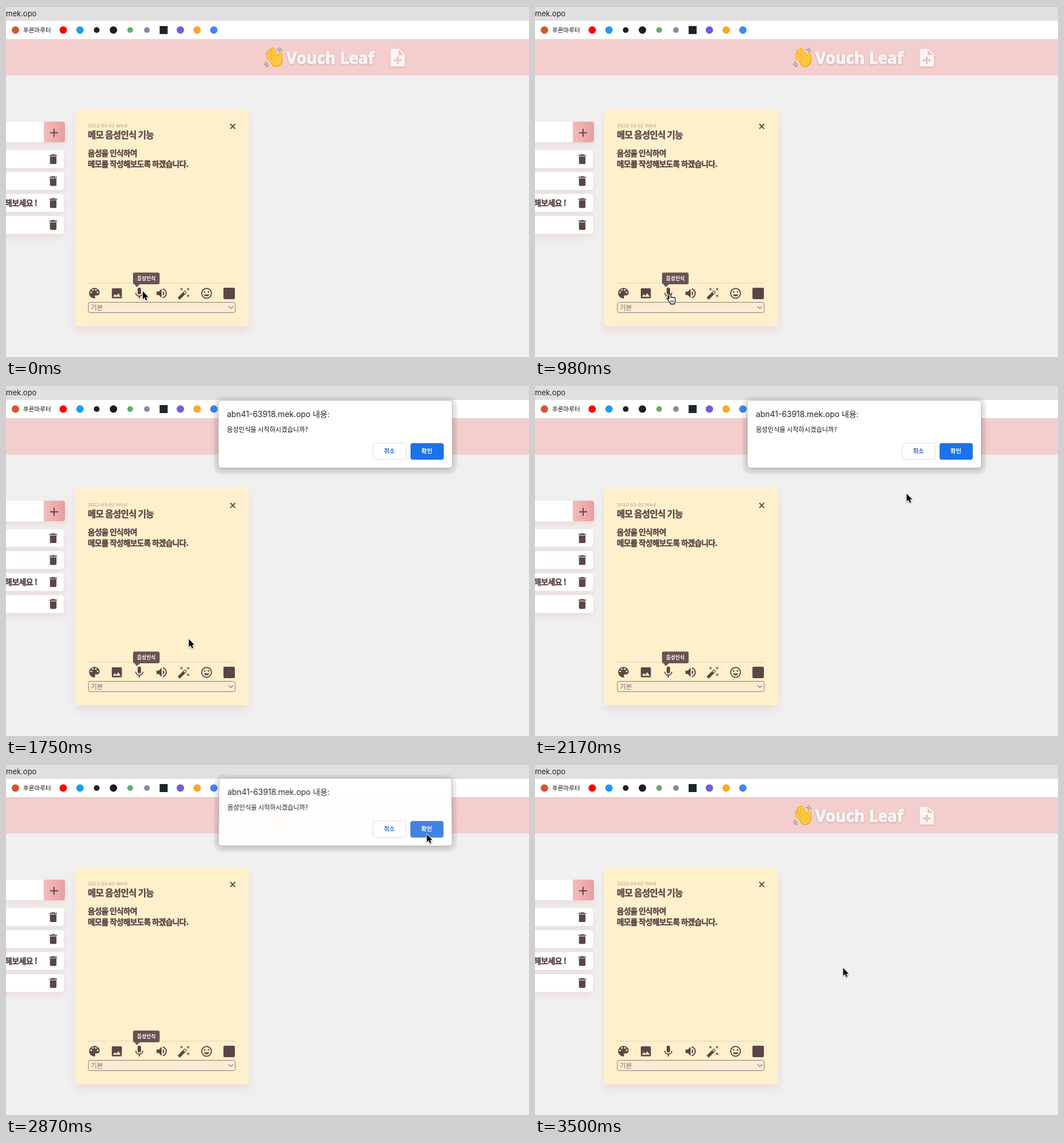
These frames come from a looping animation (914 by 613 pixels, 8 s). An HTML page with a canvas:

```html
<!DOCTYPE html>
<html lang="ko">
<head>
<meta charset="utf-8">
<title>Memo</title>
<style>
html, body { margin: 0; width: 100%; height: 100%; overflow: hidden; background: #f0f0f0; }
canvas { display: block; }
</style>
</head>
<body>
<canvas id="stage" width="914" height="613"></canvas>
<script>
const stage = document.getElementById('stage');
const ctx = stage.getContext('2d');
const LOOP = 8000, STEP = 70;
const BROWN = '#5d4546', CARD = '#fff0cc';
const KR = '"Noto Sans CJK KR", "Noto Sans CJK", sans-serif';
const UI = 'Inter, ' + KR;

// 24-unit icons
const ICON = {
  palette: 'M12 3a9 9 0 0 0 0 18c.83 0 1.5-.67 1.5-1.5 0-.39-.15-.74-.39-1.01-.23-.26-.38-.61-.38-.99 0-.83.67-1.5 1.5-1.5H16c2.76 0 5-2.24 5-5 0-4.42-4.03-8-9-8z' +
    [[6.5, 10.5], [9.5, 6.5], [14.5, 6.5], [17.5, 10.5]].map(([x, y]) => `M${x - 1.5} ${y}a1.5 1.5 0 1 0 3 0a1.5 1.5 0 1 0-3 0z`).join(''),
  image: 'M21 19V5c0-1.1-.9-2-2-2H5c-1.1 0-2 .9-2 2v14c0 1.1.9 2 2 2h14c1.1 0 2-.9 2-2zM8.5 13.5l2.5 3.01L14.5 12l4.5 6H5z',
  mic: 'M12 14a3 3 0 0 0 3-3V5a3 3 0 0 0-6 0v6a3 3 0 0 0 3 3zM17.3 11c0 3-2.54 5.1-5.3 5.1S6.7 14 6.7 11H5c0 3.41 2.72 6.23 6 6.72V21h2v-3.28c3.28-.48 6-3.3 6-6.72z',
  volume: 'M3 9v6h4l5 5V4L7 9zM16.5 12c0-1.77-1.02-3.29-2.5-4.03v8.05c1.48-.73 2.5-2.25 2.5-4.02zM14 3.23v2.06c2.89.86 5 3.54 5 6.71s-2.11 5.85-5 6.71v2.06c4.01-.91 7-4.49 7-8.77s-2.99-7.86-7-8.77z',
  wand: 'M7.5 5.6L10 7 8.6 4.5 10 2 7.5 3.4 5 2l1.4 2.5L5 7zM19.5 15.4L17 14l1.4 2.5L17 19l2.5-1.4L22 19l-1.4-2.5L22 14zM22 2l-2.5 1.4L17 2l1.4 2.5L17 7l2.5-1.4L22 7l-1.4-2.5zM14.37 7.29a1 1 0 0 0-1.41 0L1.29 18.96a1 1 0 0 0 0 1.41l2.34 2.34a1 1 0 0 0 1.41 0L16.7 11.05a1 1 0 0 0 0-1.41zM13.34 12.78l-2.12-2.12 2.44-2.44 2.12 2.12z',
  mood: 'M2 12a10 10 0 1 0 20 0a10 10 0 1 0-20 0zM4 12a8 8 0 1 0 16 0a8 8 0 1 0-16 0zM7 9.5a1.5 1.5 0 1 0 3 0a1.5 1.5 0 1 0-3 0zM14 9.5a1.5 1.5 0 1 0 3 0a1.5 1.5 0 1 0-3 0zM12 17.5c2.33 0 4.31-1.46 5.11-3.5H6.89c.8 2.04 2.78 3.5 5.11 3.5z',
  bin: 'M6 19c0 1.1.9 2 2 2h8c1.1 0 2-.9 2-2V7H6zM19 4h-3.5l-1-1h-5l-1 1H5v2h14z',
  addNote: 'M14 2H6a2 2 0 0 0-2 2v16a2 2 0 0 0 2 2h12a2 2 0 0 0 2-2V8zM16 16h-3v3h-2v-3H8v-2h3v-3h2v3h3zM13 9V3.5L18.5 9z'
};
for (const k in ICON) ICON[k] = new Path2D(ICON[k]);

const ARROW = new Path2D('M1 1.6V15.4L4.2 12.5L6.5 17.6L8.7 16.6L6.5 11.7H10.6Z');
const HAND = new Path2D('M5.2 9.5V2.5a1.5 1.5 0 0 1 3 0V7.3a1.4 1.4 0 0 1 2.7 .3a1.4 1.4 0 0 1 2.7 .5a1.3 1.3 0 0 1 2.5 .8V12.2q0 2-1.2 3.6V18.4H7.5V16.8Q5.5 14.8 4.5 12.7Q3 10.7 1.6 9.8Q.9 8.3 2.5 8.1Q4 8.1 5.2 10Z');

function icon(name, cx, cy, scale = 1, fill = BROWN) {
  ctx.save();
  ctx.translate(cx - 12 * scale, cy - 12 * scale);
  ctx.scale(scale, scale);
  ctx.fillStyle = fill;
  ctx.fill(ICON[name], 'evenodd');
  ctx.restore();
}

function rect(x, y, w, h, fill) {
  ctx.fillStyle = fill;
  ctx.fillRect(x, y, w, h);
}

function box(c, x, y, w, h, r, fill, shadow) {
  c.save();
  if (shadow) [c.shadowColor, c.shadowOffsetY, c.shadowBlur] = shadow;
  c.fillStyle = fill;
  c.beginPath();
  c.roundRect(x, y, w, h, r);
  c.fill();
  c.restore();
}

function frame(c, x, y, w, h, r, color) {
  c.strokeStyle = color;
  c.lineWidth = 1;
  c.beginPath();
  c.roundRect(x, y, w, h, r);
  c.stroke();
}

function text(c, str, x, y, font, fill, align = 'left') {
  c.font = font;
  c.fillStyle = fill;
  c.textAlign = align;
  c.fillText(str, x, y);
}

// Tight, extra heavy lettering for the notes.
function noteText(str, x, y, size) {
  ctx.save();
  ctx.letterSpacing = '-0.6px';
  ctx.lineJoin = 'round';
  ctx.lineWidth = 0.45;
  ctx.strokeStyle = BROWN;
  text(ctx, str, x, y, `700 ${size}px ${KR}`, BROWN);
  ctx.strokeText(str, x, y);
  ctx.restore();
}

function line(color, width, ...pts) {
  ctx.strokeStyle = color;
  ctx.lineWidth = width;
  ctx.beginPath();
  pts.forEach(([x, y]) => ctx.lineTo(x, y));
  ctx.stroke();
}

function bookmarks() {
  rect(0, 0, 914, 26, '#e0e0e0');
  rect(0, 0, 914, 1, '#c4c4c4');
  rect(0, 26, 914, 32, '#fff');
  rect(0, 58, 914, 1, '#d8d0d0');
  text(ctx, 'mek.opo', 0, 18, '13px ' + UI, '#222');
  text(ctx, '푸른마루터', 30, 46, '10.6px ' + KR, '#111');
  const dots = ['#d4562c', '#f00', '#1d9bf0', '#222', '#1b1f23', '#5fae6d', '#7d8fa3', '#1c242c', '#6c5ce7', '#f9a825', '#4285f4'];
  dots.forEach((color, i) => {
    const x = i ? 100 + (i - 1) * 29.25 : 16.5;
    if (i === 7) return rect(x - 7, 35, 14, 14, color);
    ctx.fillStyle = color;
    ctx.beginPath();
    ctx.arc(x, 42, i === 3 || i === 5 || i === 6 ? 5 : 6.5, 0, 7);
    ctx.fill();
  });
}

function wave() {
  ctx.save();
  ctx.lineCap = 'round';
  const fingers = [[466, 76], [460.5, 78.5], [457.5, 84], [458.5, 90.5]];
  const bases = [[474, 90], [471, 92], [468, 95], [467, 98]];
  for (const [color, w] of [['#e09a22', 6.2], ['#fdc93c', 5]]) {
    fingers.forEach((tip, i) => line(color, w, tip, bases[i]));
    line(color, w, [479.5, 84], [480, 91], [476, 97]);
    ctx.fillStyle = color;
    ctx.beginPath();
    ctx.ellipse(473, 96, w + 3.6, w + 4.6, 0.6, 0, 7);
    ctx.fill();
  }
  line('#e5a42b', 0.9, [463, 83], [470, 91]);
  line('#e5a42b', 0.9, [460.5, 88], [467, 95]);
  ctx.strokeStyle = '#8b8287';
  ctx.lineWidth = 1.3;
  [[7, 0], [10.5, 0.3]].forEach(([r, d]) => {
    ctx.beginPath();
    ctx.arc(472, 82, r, -1.3 + d, -0.3);
    ctx.stroke();
    ctx.beginPath();
    ctx.arc(460.5, 95.5, r, 1.8, 2.9 - d);
    ctx.stroke();
  });
  ctx.restore();
}

function heading() {
  wave();
  ctx.save();
  ctx.shadowColor = 'rgba(120,80,80,.3)';
  ctx.shadowOffsetY = 1;
  ctx.shadowBlur = 3;
  ctx.lineJoin = 'round';
  ctx.strokeStyle = '#fff';
  ctx.lineWidth = 1.2;
  text(ctx, 'Vouch Leaf', 490, 101, '700 28px "Open Sans", sans-serif', '#fff');
  ctx.strokeText('Vouch Leaf', 490, 101);
  icon('addNote', 684.7, 90.3, 1.55, '#fdf4f3');
  ctx.restore();
}

function list() {
  const soft = ['rgba(225,150,150,.22)', 6, 12];
  box(ctx, -20, 202, 123, 36, 4, '#fff', soft);
  const g = ctx.createLinearGradient(66, 0, 103, 0);
  g.addColorStop(0, '#f2bdbc');
  g.addColorStop(1, '#e99da0');
  box(ctx, 66, 202, 37, 36, [0, 4, 4, 0], g);
  line(BROWN, 2, [77, 221.5], [91, 221.5]);
  line(BROWN, 2, [84, 214.5], [84, 228.5]);
  for (let i = 0; i < 4; i++) {
    const y = 252 + i * 38.3;
    box(ctx, -20, y, 121, 31, 4, '#fff', soft);
    icon('bin', 82.5, y + 15.5, 0.95);
  }
  noteText('해보세요 !', -2, 349, 14);
}

function card() {
  box(ctx, 121, 180, 303.5, 379, 2, CARD, ['rgba(225,150,150,.22)', 8, 14]);
  text(ctx, '2022-03-02 Wed', 143, 211.5, '700 9px "Noto Sans", sans-serif', '#cfbea2');
  noteText('메모 음성인식 기능', 143, 230.5, 15.5);
  noteText('음성을 인식하여', 143, 262, 13.6);
  noteText('메모를 작성해보도록 하겠습니다.', 143, 281, 13.6);
  line(BROWN, 1.8, [392, 206], [400.6, 214.6]);
  line(BROWN, 1.8, [400.6, 206], [392, 214.6]);
  rect(143, 483.5, 258, 1, '#ded2b8');

  icon('palette', 154.5, 501.5, 1.03);
  icon('image', 193.7, 501.8, 0.98);
  icon('mic', 233, 501.7);
  icon('volume', 272, 501.8);
  icon('wand', 311, 501.8, 0.97);
  icon('mood', 350.5, 501.8, 0.95);
  box(ctx, 380, 492, 20, 20, 2, BROWN);

  box(ctx, 144, 517.5, 256.5, 18, 3, '#fbecd2');
  frame(ctx, 144, 517.5, 256.5, 18, 3, '#887b76');
  text(ctx, '기본', 148, 531, '11.8px ' + KR, '#806c6a');
  line('#857876', 1.1, [389, 524.5], [393, 528.5], [397, 524.5]);
}

function tooltip() {
  box(ctx, 222, 465.5, 46.5, 20.5, 3, '#6a5254');
  ctx.fillStyle = '#6a5254';
  ctx.beginPath();
  ctx.moveTo(223, 484);
  ctx.lineTo(236, 484);
  ctx.lineTo(228.5, 491);
  ctx.fill();
  text(ctx, '음성인식', 245.2, 479.3, '700 8.8px ' + KR, '#fff', 'center');
}

const PAD = 24, DW = 409, DH = 118;
const sheet = document.createElement('canvas');
sheet.width = DW + PAD * 2;
sheet.height = DH + PAD * 2;
const sc = sheet.getContext('2d');

// Dialog painted flat; a ghost has only faint panes behind its content.
function paintDialog(hover, ghost) {
  sc.clearRect(0, 0, sheet.width, sheet.height);
  sc.save();
  sc.translate(PAD, PAD);
  if (ghost) {
    box(sc, 0, 0, DW, 112, 5, 'rgba(255,255,255,.34)');
    box(sc, 11, 13, 384, 82, [12, 12, 0, 0], 'rgba(130,120,120,.13)');
    sc.globalAlpha = 0.46;
  } else {
    box(sc, -8, -6, DW + 16, DH + 16, 13, 'rgba(0,0,0,.045)');
    box(sc, 0, 0, DW, DH, 5, '#fff', ['rgba(0,0,0,.24)', 3, 14]);
    frame(sc, 0, 0, DW, DH, 5, 'rgba(0,0,0,.22)');
  }
  text(sc, 'abn41-63918.mek.opo 내용:', 15, 29, '13.9px ' + UI, '#222');
  text(sc, '음성인식을 시작하시겠습니까?', 15, 54.5, '11.2px ' + KR, '#111');
  if (!ghost) box(sc, 270.5, 74.5, 58, 28.5, 4, '#fff');
  frame(sc, 270.5, 74.5, 58, 28.5, 4, '#dcdee2');
  text(sc, '취소', 299, 92.3, '700 10.4px ' + KR, '#2f68c4', 'center');
  box(sc, 336, 74.5, 58, 29, 4, ghost ? '#5c70d0' : hover ? '#3b7de0' : '#1a73e8');
  text(sc, '확인', 364.5, 92.3, '700 10.4px ' + KR, '#fff', 'center');
  sc.restore();
}

// open: 1 is upright, 0 is tilted back and raised.
function dialog({ open, alpha, hover, ghost }) {
  paintDialog(hover, ghost);
  const top = 27 - PAD - Math.round(13 * (1 - open));
  ctx.save();
  ctx.globalAlpha = alpha;
  if (open === 1) ctx.drawImage(sheet, 371 - PAD, top);
  else for (let y = 0; y < sheet.height; y++) {
    const s = 1 - (1 - open) * (0.057 - 0.05 * (y - PAD) / DH);
    const w = sheet.width * s;
    ctx.drawImage(sheet, 0, y, sheet.width, 1, 575.5 - w / 2, top + y, w, 1);
  }
  ctx.restore();
}

function dialogAt(t) {
  const hover = t >= 2380;
  if (t < 1260 || t >= 3010) return null;
  if (t < 1330) return { open: -0.25, alpha: 0.4, ghost: true };
  if (t < 1400) return { open: 0, alpha: 1, ghost: true };
  if (t < 1470) return { open: 0.7, alpha: 0.85 };
  if (t < 2870) return { open: 1, alpha: 1, hover };
  if (t < 2940) return { open: 0.87, alpha: 0.95, hover };
  return { open: 0.2, alpha: 0.4, hover };
}

const clamp = v => Math.max(0, Math.min(1, v));
const easeOut = p => 1 - (1 - p) ** 2;
const easeInOut = p => p * p * (3 - 2 * p);
const mix = (a, b, p) => a.map((v, i) => v + (b[i] - v) * p);

const START = [238, 496.5], MIC = [232.8, 499], LEAVE = [239.5, 503], OK = [734.5, 122], REST = [537.5, 354.5];

function pointerAt(t) {
  if (t < 490) return mix(START, [234, 501], clamp((t - 280) / 280));
  if (t < 1750) return MIC;
  if (t < 2870) return mix(LEAVE, OK, easeOut(clamp((t - 1680) / 840)));
  return mix([734.5, 121], REST, easeInOut(clamp((t - 3150) / 350)));
}

function pointer(t) {
  const hand = t >= 490 && t < 1190;
  const press = t >= 770 && t < 910 ? 1 : 0;
  const [x, y] = hand ? [229, 502 + press] : pointerAt(t);
  ctx.save();
  ctx.translate(x, y);
  ctx.lineJoin = 'round';
  ctx.shadowColor = 'rgba(0,0,0,.35)';
  ctx.shadowOffsetY = 1;
  ctx.shadowBlur = 2;
  ctx.strokeStyle = hand ? '#000' : '#fff';
  ctx.lineWidth = hand ? 1.1 : 2;
  ctx.fillStyle = hand ? '#fff' : '#000';
  if (hand) {
    ctx.fill(HAND);
    ctx.shadowColor = 'transparent';
    ctx.stroke(HAND);
    for (const dx of [8.6, 10.7, 12.8]) line('#000', 0.9, [dx, 12], [dx, 15.5]);
  } else {
    ctx.stroke(ARROW);
    ctx.shadowColor = 'transparent';
    ctx.fill(ARROW);
  }
  ctx.restore();
}

function draw(t) {
  rect(0, 0, 914, 613, '#f0f0f0');
  bookmarks();
  rect(0, 59, 914, 62.5, '#f3cecd');
  list();
  card();
  if (t < 3220) tooltip();
  const d = dialogAt(t);
  // The heading shows through in front of a ghost dialog.
  if (d && d.ghost) {
    dialog(d);
    heading();
  } else {
    heading();
    if (d) dialog(d);
  }
  pointer(t);
}

const begin = performance.now();
function tick() {
  const t = (performance.now() - begin) % LOOP;
  draw(Math.floor(t / STEP) * STEP);
  requestAnimationFrame(tick);
}
tick();
</script>
</body>
</html>
```
